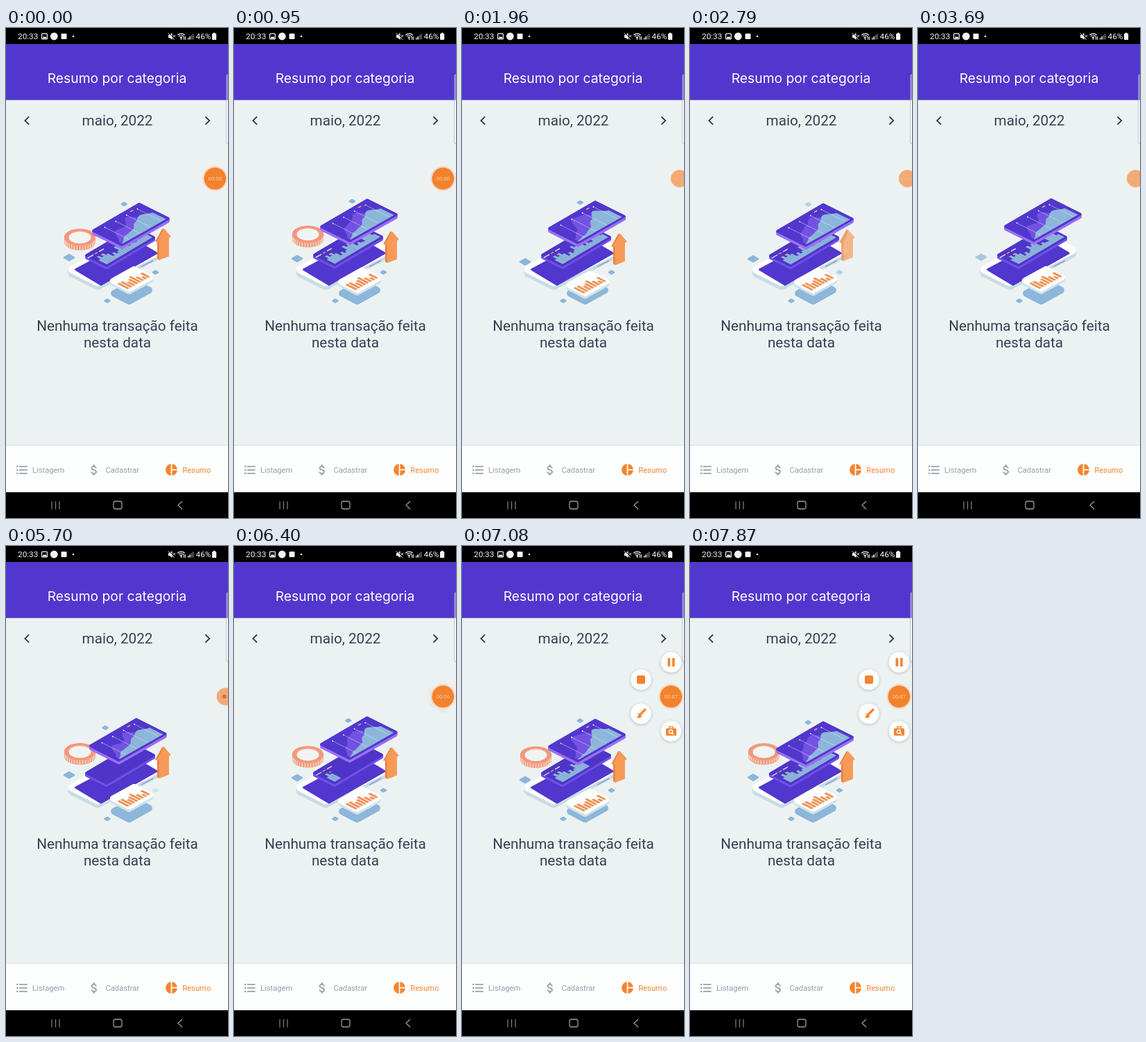
An HTML page with a canvas that plays this animation: 320 by 704 pixels, repeating every 7890 ms.

```html
<!DOCTYPE html>
<html lang="pt-BR">
<head>
<meta charset="utf-8">
<title>Resumo por categoria</title>
<style>
html, body { margin: 0; width: 100%; height: 100%; overflow: hidden; background: #ecf2f1; }
canvas, svg { position: absolute; left: 0; top: 0; width: 320px; height: 704px; }
text { font-family: Roboto, "Liberation Sans", sans-serif; }
.title { font: 19.3px Inter, "Open Sans", sans-serif; }
.big { font-size: 20.7px; fill: #364056; text-anchor: middle; }
.tab { font-size: 11.2px; fill: #969cab; }
.status { font-size: 11.8px; fill: #f4f4f4; }
</style>
</head>
<body>
<canvas id="stage"></canvas>
<svg viewBox="0 0 320 704">
  <text class="status" x="17" y="16.3">20:33</text>
  <text class="status" x="273.5" y="16.3">46%</text>
  <text class="title" x="160" y="78.5" fill="#fff" text-anchor="middle">Resumo por categoria</text>
  <text class="big" x="160.5" y="140.3">maio, 2022</text>
  <text class="big" x="160.5" y="435">Nenhuma transação feita</text>
  <text class="big" x="160.5" y="459">nesta data</text>
  <text class="tab" x="38" y="639">Listagem</text>
  <text class="tab" x="143.5" y="639">Cadastrar</text>
  <text class="tab" x="254.3" y="639" style="fill:#f5842f">Resumo</text>
</svg>
<script>
const LOOP = 7.89, RESTART = 4.3, BOB = 3.1;
const canvas = document.getElementById('stage');
const c = canvas.getContext('2d');
const dpr = window.devicePixelRatio || 1;
canvas.width = 320 * dpr;
canvas.height = 704 * dpr;

const PURPLE = '#5137cd', ORANGE = '#f5842f', BLUE = '#8cb6da', BG = '#ecf2f1';
const DOLLAR = new Path2D('M11.8 10.9c-2.27-.59-3-1.2-3-2.15 0-1.09 1.01-1.85 2.7-1.85 1.78 0 2.44.85 2.5 2.1h2.21c-.07-1.72-1.12-3.3-3.21-3.81V3h-3v2.16c-1.94.42-3.5 1.68-3.5 3.61 0 2.31 1.91 3.46 4.7 4.13 2.5.6 3 1.48 3 2.41 0 .69-.49 1.79-2.7 1.79-2.06 0-2.87-.92-2.98-2.1h-2.2c.12 2.19 1.76 3.42 3.68 3.83V21h3v-2.15c1.95-.37 3.5-1.5 3.5-3.55 0-2.84-2.43-3.81-4.7-4.4z');

const clamp = x => Math.max(0, Math.min(1, x));
const lerp = (a, b, k) => a + (b - a) * k;
const ramp = (t, a, b) => clamp((t - a) / (b - a));
const smooth = x => x < .5 ? 4 * x ** 3 : 1 - 4 * (1 - x) ** 3;
const ease = (t, a, b) => smooth(ramp(t, a, b));
// 1 while shown, with a fade out before the restart and a fade in after it
const shown = (t, out, outEnd, start, end) =>
  t < RESTART ? 1 - ramp(t, out, outEnd) : ramp(t, start, end);
// cosine drift whose phase changes at the restart
const drift = (t, first, second) =>
  Math.cos((t - (t < RESTART ? first : second)) / BOB * 2 * Math.PI);

function rect(x, y, w, h, fill, r = 0) {
  c.fillStyle = fill;
  c.beginPath();
  c.roundRect(x, y, w, h, r);
  c.fill();
}
function disc(x, y, r, fill, ry = r) {
  c.fillStyle = fill;
  c.beginPath();
  c.ellipse(x, y, r, ry, 0, 0, 7);
  c.fill();
}
function line(points, color, width) {
  c.strokeStyle = color;
  c.lineWidth = width;
  c.beginPath();
  points.forEach(p => c.lineTo(...p));
  c.stroke();
}
function poly(points, fill, r = 0, dy = 0) {
  const n = points.length, last = points[n - 1], p0 = points[0];
  c.fillStyle = fill;
  c.beginPath();
  c.moveTo((last[0] + p0[0]) / 2, (last[1] + p0[1]) / 2 + dy);
  points.forEach((p, i) => {
    const q = points[(i + 1) % n];
    c.arcTo(p[0], p[1] + dy, q[0], q[1] + dy, r);
  });
  c.closePath();
  c.fill();
}
// corners: left, top, right, bottom
function slab(points, top, side, depth, r) {
  for (let d = depth; d > 0; d -= .5) poly(points, side, r, d);
  poly(points, top, r);
}
// maps a unit square onto a slab: x along its front edge, y towards the back
const plane = ([L, , R, B]) => (x, y) =>
  [0, 1].map(i => B[i] + x * (R[i] - B[i]) + y * (L[i] - B[i]));

function flatBars(point, count, x0, x1, base, gap, fill, height, grow = 1) {
  const step = (x1 - x0) / count;
  for (let i = 0; i < count * grow; i++) {
    const a = x0 + i * step, b = a + step * (1 - gap), top = base + height(i);
    poly([point(a, base), point(a, top), point(b, top), point(b, base)], fill);
  }
}
function diamond(x, y, w, alpha, fill = BLUE) {
  c.globalAlpha = alpha;
  poly([[x - w, y], [x, y - w * .58], [x + w, y], [x, y + w * .58]], fill, 1.2);
  c.globalAlpha = 1;
}
function layer(dx, dy, alpha, draw) {
  if (alpha <= 0) return;
  c.save();
  c.translate(dx, dy);
  c.globalAlpha *= alpha;
  draw();
  c.restore();
}

function statusBar() {
  const W = '#f4f4f4';
  rect(0, 0, 320, 23, '#000');
  rect(51, 7.5, 9, 9, W, 1.5);
  rect(52.2, 8.7, 6.6, 6.6, '#000', .5);
  poly([[52.5, 15], [54.5, 12], [56, 13.3], [57.2, 11.8], [58.6, 15]], W);
  disc(69.3, 12, 5.4, W);
  rect(79.5, 8, 8, 8, W, 1);
  disc(97, 12, 1.3, W);
  // muted speaker
  poly([[234, 10], [236, 10], [239.5, 7], [239.5, 17], [236, 14], [234, 14]], W);
  line([[234.5, 6.8], [243.5, 16.2]], '#000', 1);
  line([[233.8, 7.4], [242.8, 16.8]], W, 1);
  line([[240.8, 10], [244, 13.3]], W, 1);
  line([[244, 10], [240.8, 13.3]], W, 1);
  // wifi
  c.strokeStyle = W;
  c.lineWidth = 1.3;
  for (const r of [2.6, 5.2, 7.8]) {
    c.beginPath();
    c.arc(252.5, 16, r, -2.3, -.84);
    c.stroke();
  }
  disc(252.5, 15.6, 1.1, W);
  line([[256.5, 12], [256.5, 17]], W, 1);
  line([[258.5, 12], [258.5, 17]], W, 1);
  for (let i = 0; i < 4; i++)
    rect(262 + i * 2.3, 14.3 - i * 2, 1.5, 2.2 + i * 2, i < 2 ? W : '#777');
  rect(298.8, 6.8, 2.8, 2, W);
  rect(297, 8, 6.2, 9, W, 1);
}

function chrome() {
  rect(0, 0, 320, 704, BG);
  rect(0, 23, 320, 80.5, PURPLE);
  statusBar();
  c.lineCap = 'round';
  line([[32.6, 127.8], [27.4, 133], [32.6, 138.2]], '#333b4b', 1.9);
  line([[288, 127.8], [293.2, 133], [288, 138.2]], '#333b4b', 1.9);
  c.lineCap = 'butt';

  rect(0, 599, 320, 1.3, '#d8dfde');
  rect(0, 600, 320, 67, '#fdfffe');
  for (const y of [630, 635, 640]) {
    disc(16.3, y, 1.3, '#969cab');
    rect(19, y - .85, 11.6, 1.7, '#969cab');
  }
  c.save();
  c.translate(117.2, 625);
  c.scale(.83, .83);
  c.fillStyle = '#969cab';
  c.fill(DOLLAR);
  c.restore();
  disc(238.5, 634.7, 8.5, ORANGE);
  rect(237.7, 626, 1.7, 18, '#fdfffe');
  rect(239, 633.8, 9, 1.7, '#fdfffe');

  rect(0, 667, 320, 37, '#000');
  for (const x of [66, 71.5, 77]) line([[x, 680], [x, 691.5]], '#858585', 1.2);
  c.strokeStyle = '#999';
  c.lineWidth = 1.3;
  c.beginPath();
  c.roundRect(155, 680, 12, 11, 3);
  c.stroke();
  line([[254, 680], [248, 685.6], [254, 691.2]], '#999', 1.3);
}

function edgeHandle() {
  c.beginPath();
  c.roundRect(317.5, 66.5, 8, 100, 2.5);
  c.fillStyle = 'rgba(255,255,255,.4)';
  c.fill();
  c.strokeStyle = 'rgba(150,150,175,.5)';
  c.lineWidth = 1;
  c.stroke();
}

function phone() {
  slab([[82.5, 347], [186, 294.3], [235.5, 319], [132, 371.7]], '#fdfefe', '#c8dce6', 5.5, 6);
  poly([[97.5, 347], [182.5, 301.5], [220, 323.5], [137, 370.5]], PURPLE, 1.5);
  line([[195, 343], [212, 334]], '#8ea4d6', 1.8);
}

function middleCard(grow) {
  const card = [[112, 326.5], [184, 284], [217, 300.5], [145, 343]];
  slab(card, '#4e35c8', '#7050e6', 3.5, 2);
  if (!grow) return;
  const point = plane(card);
  line([[118, 330], [126, 325.5]], '#e8e4ff', 1.4);
  line([[128, 324.3], [132, 322]], '#f5a35a', 1.4);
  line([[134, 320.8], [141, 317]], '#e8e4ff', 1.4);
  flatBars(point, 22, .05, .96, .1, -.05, BLUE,
    i => .36 + .14 * Math.sin(i * .75) + .1 * Math.sin(i * 2.3), grow);
  line([point(.17, .6), point(.2, .6)], '#f5a35a', 1.6);
}

// smooth area over the front edge of the upper card
function area(point, heights, fill) {
  const n = heights.length - 1, pts = [point(.06, .07)];
  for (let i = 0; i <= 40; i++) {
    const s = i / 40 * n, k = Math.min(n - 1, Math.floor(s)), f = s - k;
    const y = lerp(heights[k], heights[k + 1], f * f * (3 - 2 * f));
    pts.push(point(.06 + .88 * i / 40, y));
  }
  pts.push(point(.94, .07));
  poly(pts, fill);
}

function topCard(morph) {
  const card = [[122, 288.5], [192, 248], [238, 271], [167, 311]];
  const point = plane(card);
  slab(card, PURPLE, '#9a70f5', 4, 2);
  area(point, [.2, lerp(.6, .4, morph), lerp(.5, .86, morph), .8, .55, .4], '#7351e2');
  area(point, [.1, lerp(.28, .16, morph), lerp(.32, .26, morph), .5, lerp(.62, .74, morph), .5], BLUE);
  for (const x of [.2, .42, .64, .86]) {
    line([point(x, .1), point(x, .86)], 'rgba(240,240,255,.65)', .7);
    disc(...point(x, .86), .9, '#fff');
  }
  line([point(.74, .9), point(.8, .9)], '#f7b45c', 1.5);
}

function miniCard(dy) {
  const card = [[145.5, 368.5], [184.5, 347], [216.5, 363.5], [177.5, 385]];
  layer(0, dy, 1, () => {
    slab(card, '#fdfefe', '#cfe2ea', 3.5, 4);
    flatBars(plane(card), 8, .08, .95, .17, .28, '#ef9155',
      i => .36 + .12 * Math.sin(i * 1.7 + 1) + .06 * Math.sin(i * .8));
  });
}

function coin(x, y, white) {
  for (let d = 7; d >= 0; d -= .5) disc(x, y + d, 22.5, '#f0a083', 12);
  for (let i = 0; i < 15; i++) {
    const a = .25 + i / 14 * 2.64, px = x + 22 * Math.cos(a), py = y + 12 * Math.sin(a);
    line([[px, py + 1], [px, py + 6.5]], '#fbe0d2', 1);
  }
  disc(x, y, 22.5, '#f3977d', 12);
  disc(x, y, 16.5, '#f7b29c', 9);
  layer(x, y, 1 - white, () => {
    c.scale(.85, .6);
    c.translate(-11.8, -12);
    c.fillStyle = '#fff';
    c.fill(DOLLAR);
  });
  layer(0, 0, white, () => disc(x, y + .5, 15.8, '#f1f4f2', 8.6));
}

function arrow() {
  poly([[226, 288], [215.5, 307], [218.5, 306.5], [218.5, 331.5], [222, 333.5], [222, 305], [229, 289]], '#e77f3f', .5);
  poly([[228, 287.5], [238.5, 299.5], [235.5, 301.5], [235.5, 328], [221, 333.5], [221, 306.5], [217.5, 307.5]], '#f79a58', .7);
}

function illustration(t) {
  const slow = drift(t, 1.9, 7.1), float = 1.5 + 3.5 * slow;
  const hover = drift(t, -.32, 7.87);
  const intro = t >= RESTART;
  const settle = intro ? 1 - ease(t, 4.4, 5.4) : 0;

  const tile = [[145.5, 381.5], [184.5, 360], [216.5, 376.5], [177.5, 398]];
  diamond(146, 392, 6, shown(t, 3.9, 4.25, 4.5, 5.2));
  diamond(91, 331 + float, 9.5, shown(t, 3.5, 4.1, 4.6, 5.4));
  phone();
  poly(tile, BLUE, 5);
  layer(0, 0, settle, () => poly(tile, '#a9b0dc', 5));
  diamond(215.5, 351, 6, shown(t, 2.5, 3.2, 5.5, 6.3));

  layer(intro ? -12 * (1 - ease(t, 4.75, 5.5)) : 0, hover * .5,
    shown(t, 4, 4.28, 4.8, 5.2),
    () => middleCard(intro ? ramp(t, 6.2, 7.8) : 1));

  const travel = intro ? ease(t, 4.6, 7.3) : 1;
  diamond(lerp(133, 170.3, travel), lerp(266, 251, travel) + hover * 2.5, 6,
    shown(t, 2.5, 3.2, 4.6, 5.5));

  const land = intro ? (1 - ramp(t, 4.8, 6.6)) ** 2 : 0;
  const lift = t < RESTART ? -2.5 * ease(t, 2.8, 3.7) : 0;
  const slide = intro ? 1 - ease(t, 4.6, 5.5) : 0;
  const coinY = 297.3 + 3.2 * drift(t, 0, 6.8) + 7 * slide;
  layer(0, 0, shown(t, 1.3, 1.8, 4.5, 5.1), () =>
    coin(106.5 + 11 * slide, coinY, 1 - slide));
  layer(-17 * land, hover * 3.5 + lift, shown(t, 3.8, 4.2, 4.85, 5.35),
    () => topCard((slow + 1) / 2));

  layer(-.6, 4 + 4 * drift(t, 1.7, 7.5), shown(t, 2.6, 3.2, 5, 5.5), arrow);
  miniCard(lerp(float - 4, 4, settle));
}

function button(x, y, k, draw) {
  layer(lerp(301, x, k), lerp(216, y, k), clamp(k * 1.5), () => {
    c.scale(k, k);
    c.save();
    c.shadowColor = 'rgba(60,70,80,.3)';
    c.shadowBlur = 4 * dpr;
    c.shadowOffsetY = dpr;
    disc(0, 0, 14.8, '#fdfefd');
    c.restore();
    draw();
  });
}

function recorder(t) {
  const dock = ease(t, 1.2, 1.6) - ease(t, 5.85, 6.2);
  const open = ease(t, 6.25, 6.6);
  if (open > 0) {
    button(301.5, 167, open, () => {
      rect(-5, -6, 3.6, 12, ORANGE, .6);
      rect(1.6, -6, 3.6, 12, ORANGE, .6);
    });
    button(258, 192, open, () => rect(-6, -6, 12, 12, ORANGE, 2));
    button(258, 241, open, () => {
      c.lineCap = 'round';
      line([[6, -6], [0, 0]], ORANGE, 3.2);
      c.lineCap = 'butt';
      poly([[-2, -.5], [1.5, 3], [-1, 6], [-7.5, 6], [-5.5, 4], [-5, 1]], ORANGE, 1.5);
    });
    button(301.5, 266, open, () => {
      rect(-7.5, -4, 15, 10.5, ORANGE, 1.5);
      rect(-3.5, -7, 7, 4, ORANGE, 1);
      rect(-2, -5.6, 4, 1.6, '#fdfefd');
      disc(-.5, .8, 3.2, '#fdfefd');
      disc(-.5, .8, 1.8, ORANGE);
      line([[1.5, 3], [3.8, 5]], '#fdfefd', 1.3);
    });
  }
  const x = lerp(301.3, 313.5, dock) + 2.7 * (ramp(t, 5.4, 5.6) - ramp(t, 5.85, 6.1));
  layer(x, 216.3, lerp(1, .58, dock), () => {
    disc(0, 0, lerp(18, 13.2, dock), '#f4d8c5');
    disc(0, 0, lerp(15.8, 12.4, dock), '#f3822c');
    if (t > 5.4 && t < 6) return disc(-1.5, 0, 3, '#cf4420');
    const label = t < 4 ? 1 - .6 * dock : ramp(t, 6, 6.2);
    layer(0, 0, label, () => {
      c.fillStyle = '#ffd2ac';
      c.font = '7.8px Roboto, "Liberation Sans", sans-serif';
      c.textAlign = 'center';
      c.fillText('00:0' + Math.floor(t), 0, 2.8);
    });
  });
}

function frame(now) {
  const t = now / 1000 % LOOP;
  c.setTransform(dpr, 0, 0, dpr, 0, 0);
  chrome();
  illustration(t);
  edgeHandle();
  recorder(t);
}
const start = performance.now();
function tick() {
  frame(performance.now() - start);
  requestAnimationFrame(tick);
}
tick();
</script>
</body>
</html>
```
